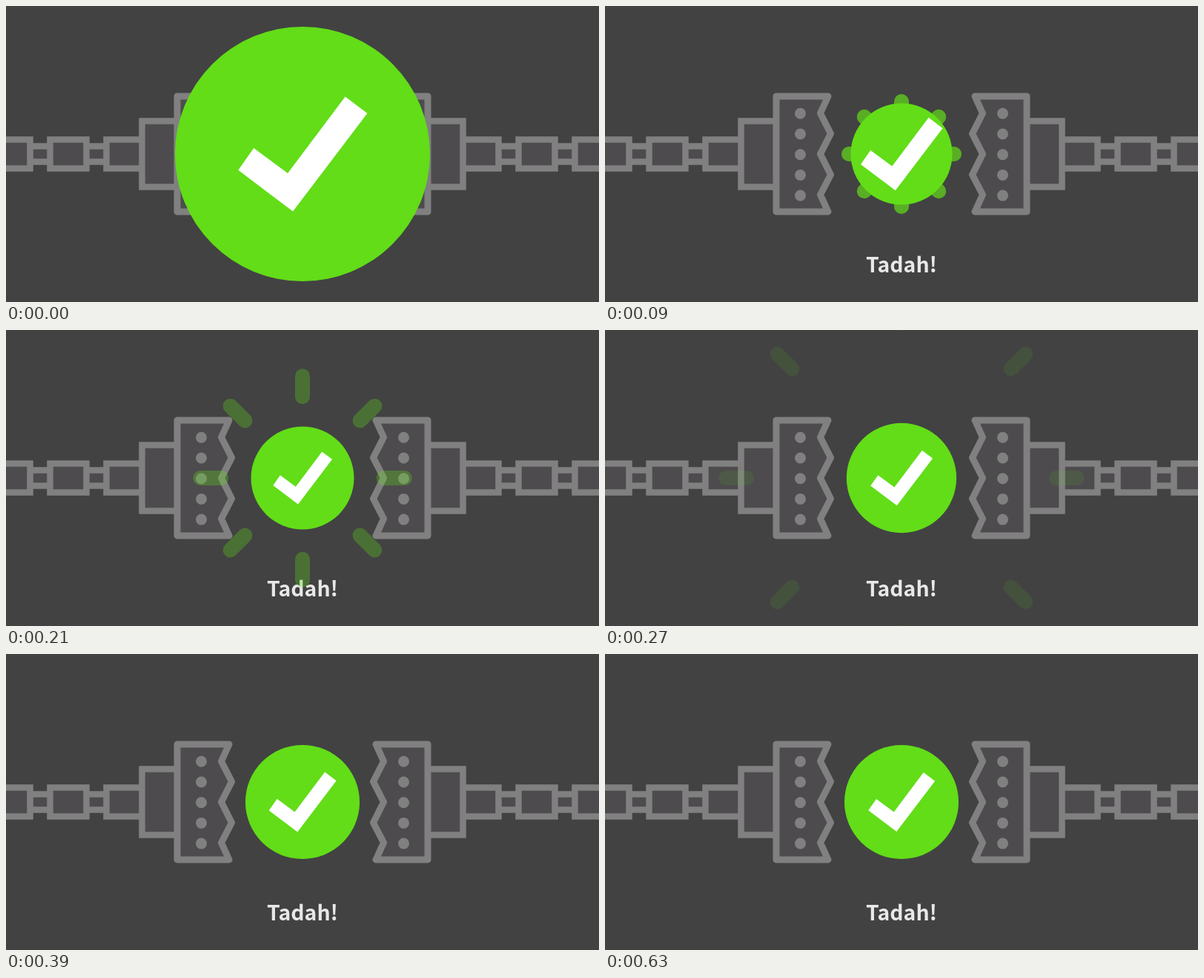
An HTML page for the animation above (1.2 s loop, 800x400 px).

```html
<!DOCTYPE html>
<html lang="en">
<head>
<meta charset="utf-8">
<title>Tadah</title>
<style>
  html, body { margin: 0; width: 100%; height: 100%; overflow: hidden; background: #424242; }
  svg { display: block; width: 100%; height: 100%; }
  text {
    font: 600 28.4px "Noto Sans CJK JP", "Noto Sans CJK SC", "Noto Sans CJK", "Noto Sans", sans-serif;
    fill: #e8e8e8;
    text-anchor: middle;
  }
</style>
</head>
<body>
<svg viewBox="0 0 800 400">
  <defs>
    <g id="half" fill="#4d4b4d" stroke="#808080" stroke-width="8.5">
      <path d="M20 189.5H70V210.5H20ZM100 189.5H145V210.5H100Z"/>
      <path d="M-20 180.5H32.5V219.5H-20ZM59.5 180.5H108.5V219.5H59.5ZM135.5 180.5H190V219.5H135.5Z"/>
      <path d="M183.5 155.5H240V244.5H183.5Z"/>
      <path stroke-width="9" stroke-linejoin="round"
        d="M231 122H301L290.5 145L304.5 172.5L290.5 200L304.5 228L290.5 255L301 278H231Z"/>
      <path stroke-width="15" stroke-linecap="round"
        d="M263.5 145.3h0M263.5 173h0M263.5 200.7h0M263.5 228.4h0M263.5 256.1h0"/>
    </g>
  </defs>
  <use href="#half"/>
  <use href="#half" transform="matrix(-1 0 0 1 800 0)"/>
  <text x="400" y="360">Tadah!</text>
  <g transform="translate(400 200)">
    <g id="beams" stroke="#62dd18" stroke-width="20" stroke-linecap="round"></g>
    <circle id="disc" fill="#62dd18"/>
    <path id="check" fill="#fff" d="M29.8-40.1L45.2-28.4L-6.7 40.1L-44.8 11.3L-34-4.1L-10.3 13.4Z"/>
  </g>
</svg>
<script>
const LOOP = 1200, STEP = 30, REST = 630, BEAM_TIME = 300;
const { sin, cos, exp, min, max } = Math;
const [beams, disc, check] = ["beams", "disc", "check"].map(id => document.getElementById(id));

for (let a = 0; a < 360; a += 45) {
  const line = document.createElementNS("http://www.w3.org/2000/svg", "line");
  line.setAttribute("transform", `rotate(${a})`);
  beams.append(line);
}

// Both pieces settle like damped springs, the check a little later.
const discRadius = t => min(172, 77 * (1 - 2.04 * exp(-0.01443 * t) * sin(0.0102 * (t - 70.5))));

function checkScale(t) {
  const k = 0.0096, w = 0.014, s = t + 23;
  return 1 + exp(-k * s) * (cos(w * s) + k / w * sin(w * s));
}

function draw(t) {
  disc.setAttribute("r", discRadius(t));
  check.setAttribute("transform", `scale(${checkScale(t)})`);
  const p = min(1, t / BEAM_TIME);
  const dist = 53.4 + 245 * p ** 3.5;
  beams.setAttribute("opacity", max(0, 1 - p));
  for (const line of beams.children) {
    line.setAttribute("x1", dist - 14);
    line.setAttribute("x2", dist + 14);
  }
}

const start = performance.now();
function tick() {
  const t = (performance.now() - start) % LOOP;
  draw(min(REST, Math.floor(t / STEP) * STEP));
  requestAnimationFrame(tick);
}
tick();
</script>
</body>
</html>
```
